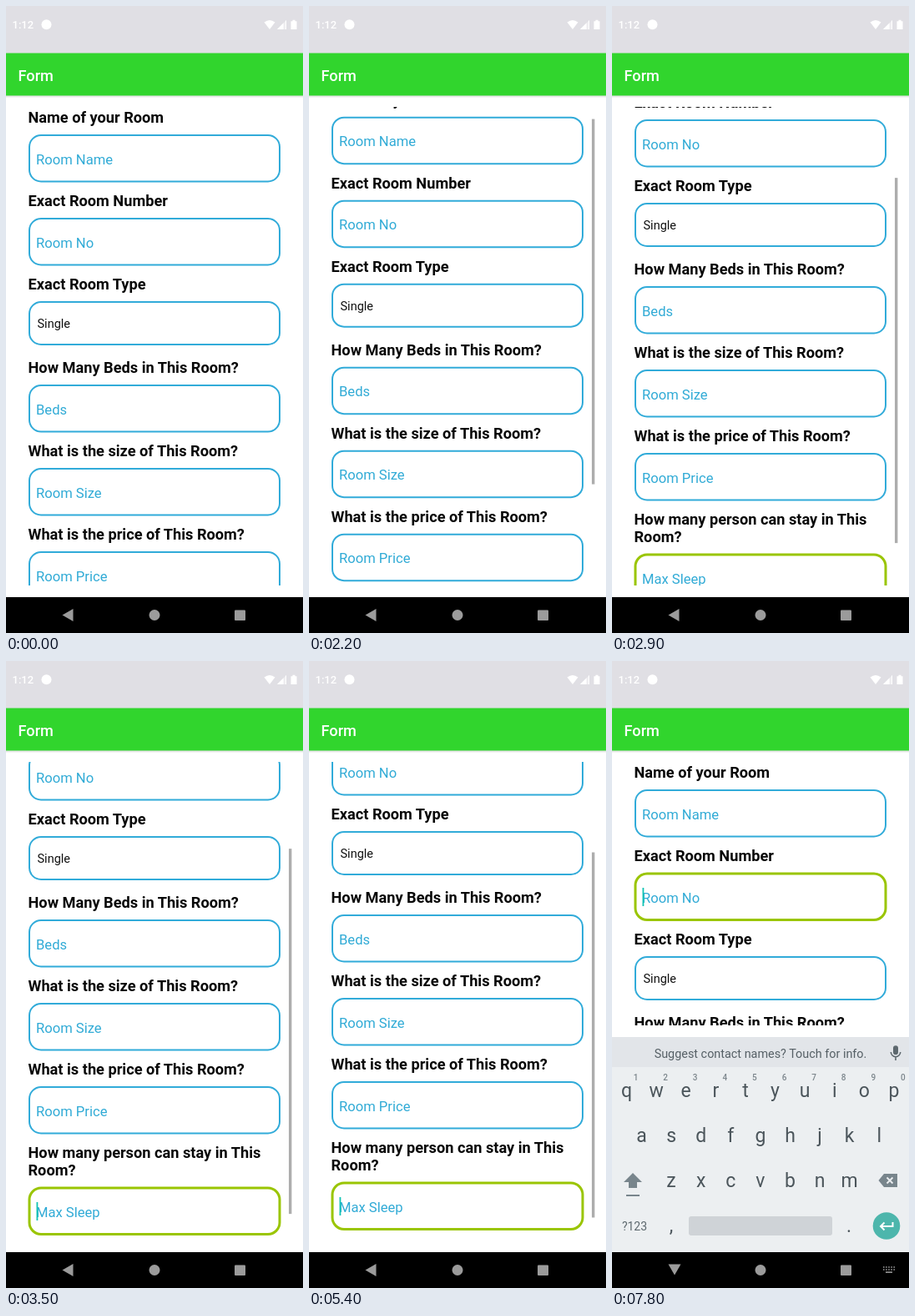
An HTML page that plays this animation: 356 by 752 pixels, repeating every 8000 ms.

```html
<!DOCTYPE html>
<html lang="en">
<head>
<meta charset="utf-8">
<title>Room form</title>
<style>
  html, body { margin: 0; width: 100%; height: 100%; overflow: hidden; background: #fff; }
  svg { display: block; width: 356px; height: 752px; font-family: Roboto, "Noto Sans", sans-serif; }
  .label { font-size: 18.2px; font-weight: 700; fill: #080808; }
  .hint { font-size: 16.6px; fill: #31abd6; }
  .box { fill: #fff; stroke: #31abd9; stroke-width: 2; }
  .focus .box { stroke: #9ac503; stroke-width: 3; }
  .caret { fill: #12c4b4; visibility: hidden; }
  .focus.lit .caret { visibility: visible; }
  .key { font-size: 23px; fill: #4b555b; text-anchor: middle; }
  .digit { font-size: 10px; font-weight: 500; fill: #7c868c; text-anchor: middle; }
</style>
</head>
<body>
<svg viewBox="0 0 356 752">
  <defs>
    <clipPath id="view"><rect id="viewRect" x="14" y="121" width="328" height="574"/></clipPath>
    <clipPath id="above"><rect width="356" height="709"/></clipPath>
    <linearGradient id="shade" x2="0" y2="1">
      <stop stop-color="#000" stop-opacity=".14"/><stop offset="1" stop-color="#000" stop-opacity="0"/>
    </linearGradient>
  </defs>
  <rect width="356" height="752" fill="#fff"/>

  <g clip-path="url(#view)">
    <g id="form">
      <circle cx="178" cy="1319" r="463" fill="#e2f7e3"/>
    </g>
  </g>
  <rect id="bar" x="339" y="120" width="3.4" height="438" fill="#adadad"/>

  <rect width="356" height="57" fill="#e0dfe4"/>
  <rect y="56.5" width="356" height="51" fill="#31d52d"/>
  <rect y="107.5" width="356" height="3" fill="url(#shade)"/>
  <text x="14.5" y="89.5" font-size="18.2" font-weight="500" fill="#fff">Form</text>
  <g fill="#fff">
    <text x="7.5" y="27.3" font-size="13" font-weight="500">1:12</text>
    <circle cx="48.5" cy="22.3" r="6"/>
    <path d="M309.5 19.5Q316 14.5 322.5 19.5L316 28Z"/>
    <path d="M325 28L336 17V28Z" opacity=".45"/>
    <path d="M325 28L332.5 20.5V28Z"/>
    <path d="M335 17.5h1V28h-1z"/>
    <path d="M341.5 18.2h2v-1.4h3v1.4h2V28h-7z"/>
  </g>

  <g clip-path="url(#above)">
    <g id="keyboard">
      <rect y="451" width="356" height="258" fill="#eceff1"/>
      <rect y="451" width="356" height="36" fill="#e2e5e9"/>
      <text x="178" y="476" font-size="14.4" fill="#566066" text-anchor="middle">Suggest contact names? Touch for info.</text>
      <g fill="none" stroke="#5d686e" stroke-width="1.6">
        <rect x="337.8" y="462" width="4.4" height="9.5" rx="2.2" fill="#5d686e"/>
        <path d="M334.3 469a5.7 5.7 0 0 0 11.4 0M340 475v4"/>
      </g>
      <path d="M25 614L36 625H30V632H20V625H14Z" fill="#78858c"/>
      <rect x="17" y="640" width="16" height="2" fill="#78858c"/>
      <path d="M319.5 623L326 615H342V631H326Z" fill="#78858c"/>
      <path d="M329.5 619.5l7 7m0-7l-7 7" stroke="#eceff1" stroke-width="1.8"/>
      <text x="27" y="682.5" font-size="14" fill="#5d686e" text-anchor="middle">?123</text>
      <rect x="92" y="666" width="172" height="23" rx="3" fill="#cfd3d7"/>
      <circle cx="329" cy="677.5" r="16.3" fill="#4db6ac"/>
      <path d="M336.5 673v5H322m4.5-4.5l-4.5 4.5l4.5 4.5" fill="none" stroke="#fff" stroke-width="2"/>
    </g>
  </g>

  <rect y="709" width="356" height="43" fill="#000"/>
  <g fill="#9b9b9b">
    <path id="back" d="M67.5 730.5L80.5 723V738Z"/>
    <path id="down" d="M67.5 723.5H82.5L75 736.5Z"/>
    <circle cx="178" cy="730.5" r="6.5"/>
    <rect x="274" y="724.5" width="13" height="12.5" rx="1"/>
    <g id="switcher">
      <path d="M325 727h14M325 730h14" stroke="#9b9b9b" stroke-width="1.6" stroke-dasharray="1.6 1.5"/>
      <rect x="328" y="732.3" width="8" height="1.6"/>
    </g>
  </g>
</svg>
<script>
const LOOP = 8000, STEP = 100;
const $ = id => document.getElementById(id);
const form = $('form'), keyboard = $('keyboard');

function add(parent, tag, attrs, text) {
  const el = document.createElementNS('http://www.w3.org/2000/svg', tag);
  for (const k in attrs) el.setAttribute(k, attrs[k]);
  if (text) el.textContent = text;
  return parent.appendChild(el);
}

function field(y, hint) {
  const g = add(form, 'g', {});
  add(g, 'rect', { class: 'box', x: 28, y, width: 300, height: 55.5, rx: 14 });
  add(g, 'text', { class: 'hint', x: 36, y: y + 34.7 }, hint);
  add(g, 'rect', { class: 'caret', x: 36.5, y: y + 17, width: 1.8, height: 22 });
  return g;
}

const rows = [
  ['Name of your Room', 'Room Name'],
  ['Exact Room Number', 'Room No'],
  ['Exact Room Type'],
  ['How Many Beds in This Room?', 'Beds'],
  ['What is the size of This Room?', 'Room Size'],
  ['What is the price of This Room?', 'Room Price'],
  ['How many person can stay in This', 'Max Sleep']
];
const fields = rows.map(([label, hint], i) => {
  const y = 155 + 100 * i;
  add(form, 'text', { class: 'label', x: 26.5, y: y - 14.7 }, label);
  if (!hint) {
    add(form, 'rect', { class: 'box', x: 28, y, width: 300, height: 51, rx: 14 });
    return add(form, 'text', { x: 37.5, y: y + 31, 'font-size': 14.5, fill: '#111' }, 'Single');
  }
  return field(i === 6 ? y + 21 : y, hint);
});
add(form, 'text', { class: 'label', x: 26.5, y: 761.3 }, 'Room?');
add(form, 'rect', { x: 137.5, y: 852, width: 81, height: 41, rx: 4, fill: '#000', opacity: .14 });
add(form, 'rect', { x: 138, y: 850, width: 80, height: 41, rx: 3, fill: '#2fd42f' });
add(form, 'text', { x: 154, y: 877, 'font-size': 16.5, 'font-weight': 700, 'letter-spacing': 2, fill: '#fff' }, 'NEXT');

[['qwertyuiop', 17.5, 523], ['asdfghjkl', 35.5, 577], ['zxcvbnm', 71, 631]].forEach(([keys, x, y]) =>
  [...keys].forEach((k, i) => add(keyboard, 'text', { class: 'key', x: x + 35.6 * i, y }, k)));
[...'1234567890'].forEach((d, i) => add(keyboard, 'text', { class: 'digit', x: 28.5 + 35.6 * i, y: 503 }, d));
add(keyboard, 'text', { class: 'key', x: 71, y: 685 }, ',');
add(keyboard, 'text', { class: 'key', x: 284, y: 685 }, '.');

// [time, value] tables, linear in between
const scrollKeys = [[2000, 0], [2300, 32], [2600, 81.5], [2900, 118], [3200, 137], [3500, 144], [3600, 144],
  [3900, 172], [4200, 194], [4500, 201], [5200, 201], [5400, 150], [5600, 65], [5800, 12], [6000, 0]];
const barKeys = [[2000, 0], [2100, 1], [4700, 1], [5100, 0], [5200, 0], [5300, 1], [6100, 1], [6300, .12], [6500, .12], [6600, 0]];
const slideKeys = [[6500, 258], [6600, 215], [6700, 90], [6800, 22], [6900, 0]];

function at(keys, t) {
  if (t <= keys[0][0]) return keys[0][1];
  for (let i = 1; i < keys.length; i++) {
    const [t0, a] = keys[i - 1], [t1, b] = keys[i];
    if (t <= t1) return a + (b - a) * (t - t0) / (t1 - t0);
  }
  return keys[keys.length - 1][1];
}

const show = (id, on) => $(id).style.visibility = on ? 'visible' : 'hidden';

function draw(t) {
  const scroll = at(scrollKeys, t), typing = t >= 6600;
  form.setAttribute('transform', `translate(0 ${-scroll})`);
  $('bar').setAttribute('y', 120 + Math.min(137, scroll * .73));
  $('bar').setAttribute('opacity', at(barKeys, t));
  $('viewRect').setAttribute('height', t >= 6700 ? 316 : 574);

  const active = t >= 7700 ? 1 : typing ? 0 : 6;
  const blinkStart = t >= 7700 ? 7700 : typing ? 7000 : 300;
  const lit = (t - blinkStart + 1000) % 1000 < 500 || (typing && t < 7000);
  fields.forEach((f, i) => {
    f.classList.toggle('focus', i === active);
    f.classList.toggle('lit', lit);
  });

  keyboard.setAttribute('transform', `translate(0 ${at(slideKeys, t)})`);
  show('keyboard', typing);
  show('back', !typing);
  show('down', typing);
  show('switcher', typing);
}

const start = performance.now();
function tick() {
  const t = (performance.now() - start) % LOOP;
  draw(Math.floor(t / STEP) * STEP);
  requestAnimationFrame(tick);
}
tick();
</script>
</body>
</html>
```
